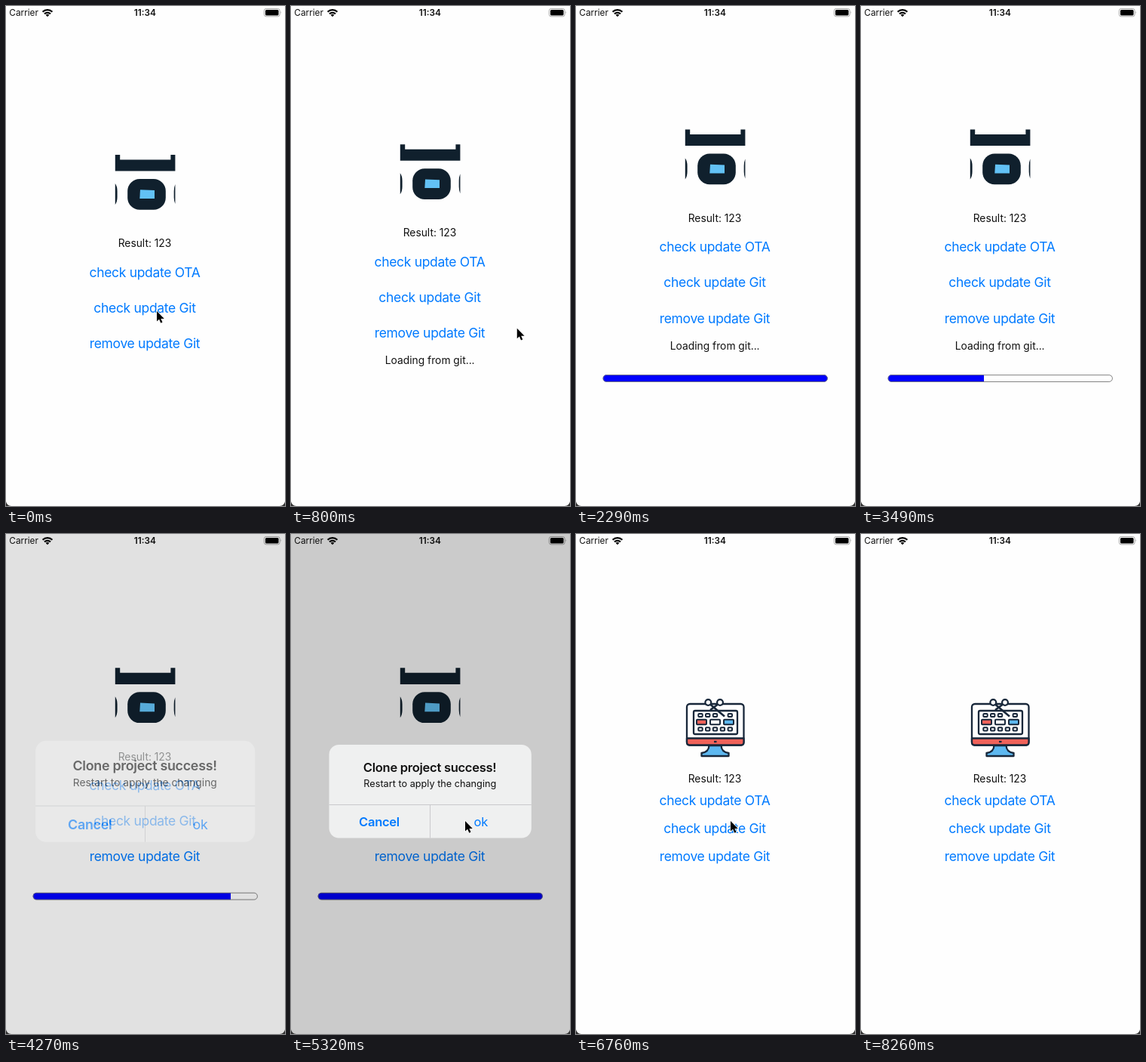
Recreate the animation shown at these times as an HTML page. Size 370 by 662 pixels, loop 8.31 s.

```html
<!DOCTYPE html>
<html lang="en">
<head>
<meta charset="utf-8">
<title>Update flow</title>
<style>
  html, body { margin: 0; width: 100%; height: 100%; overflow: hidden; background: #fefefe; }
  svg { display: block; width: 370px; height: 662px; }
  text { font-family: Inter, Roboto, sans-serif; font-size: 13.8px; fill: #111; }
  .mid text, text.mid { text-anchor: middle; }
  .link text { font-size: 17.5px; letter-spacing: -.018em; fill: #007aff; }
  .status text { font-size: 11.8px; }
  .alert text { font-size: 16.5px; letter-spacing: -.016em; }
  .alert .note { font-size: 12.7px; letter-spacing: 0; }
  .alert .action { fill: #007aff; }
  .strong { font-weight: 600; }
  .soft { filter: blur(.45px); }
</style>
</head>
<body>
<svg viewBox="0 0 370 662">
  <rect width="370" height="662" fill="#fefefe"/>

  <g class="status">
    <text x="4.3" y="13.4">Carrier</text>
    <g fill="none" stroke="#000" stroke-width="2.2">
      <path d="M48.6 7.7a9.2 9.2 0 0 1 12.8 0M51 10.4a5.8 5.8 0 0 1 8 0"/>
    </g>
    <path d="M52.8 11.9a3.2 3.2 0 0 1 4.4 0L55 14.2z"/>
    <text class="mid strong" x="184.3" y="13.4">11:34</text>
    <rect x="342.3" y="3.500" width="20.800" height="10.400" rx="2.800" fill="none" stroke="#aaa"/>
    <rect x="343.900" y="5" width="17.600" height="7.500" rx="1.600"/>
    <path d="M364.400 7.100q1.600 1.600 0 3.200z" fill="#aaa"/>
  </g>

  <g id="before" class="mid">
    <g id="stack">
      <g class="soft">
        <g fill="#10202d">
          <path d="M144.800 197h6.400v6.500h67.200V197h6v21.600h-79.600z"/>
          <rect x="161.200" y="229" width="50.600" height="40.800" rx="16"/>
          <path d="M144.800 235q2.800 4 2.800 10v8q0 6-2.800 10zM224.400 236q-1.700 4-1.700 9v8q0 5 1.700 9z"/>
        </g>
        <path d="M178 243.300l19 .8v10.800h-19.700z" fill="#62c1f5"/>
      </g>
      <text x="184" y="319.300">Result: 123</text>
      <g class="link">
        <text x="184" y="358.500">check update OTA</text>
        <text x="184" y="405.800" id="git">check update Git</text>
        <text x="184" y="453">remove update Git</text>
      </g>
      <text x="184.200" y="488" id="loading">Loading from git...</text>
    </g>
    <g id="bar">
      <clipPath id="pill"><rect x="35.700" y="488.300" width="298" height="9.400" rx="4.700"/></clipPath>
      <rect id="fill" x="35" y="488" height="10" fill="#00f" clip-path="url(#pill)"/>
      <rect x="36" y="488.600" width="297.400" height="8.900" rx="4.450" fill="none" stroke="#777" stroke-width=".9"/>
    </g>
  </g>

  <g id="after" class="mid">
    <g stroke="#18273a" stroke-width="2.300" fill="#fff" stroke-linejoin="round">
      <path d="M176.500 280h16q.5 9 10 10v4h-36v-4q9.500-1 10-10z" fill="#5db8f0"/>
      <rect x="147" y="225" width="75.500" height="54.500" rx="4"/>
      <path d="M147 270.500h75.500v5.500q0 3.500-3.500 3.500h-68.500q-3.500 0-3.500-3.500z" fill="#f0625a"/>
      <rect x="156" y="234" width="58" height="31" rx="2"/>
      <path d="M183 275h3.500"/>
      <g id="keys" stroke-width="2"></g>
      <path d="M178.500 226l18.500 15.500M187.500 226l-9.500 7" stroke-width="2.600"/>
      <circle cx="175.300" cy="223" r="3.900"/>
      <circle cx="191" cy="223" r="3.900"/>
    </g>
    <text x="184" y="329.300">Result: 123</text>
    <g class="link">
      <text x="184" y="358.500">check update OTA</text>
      <text x="184" y="395.800">check update Git</text>
      <text x="184" y="433.100">remove update Git</text>
    </g>
  </g>

  <rect id="dim" width="370" height="662"/>
  <g id="alert" class="alert mid">
    <rect x="50.500" y="279" width="268.300" height="123.600" rx="13" fill="#eff0f0"/>
    <path d="M50.500 358.500h268.300M184.500 358.500v44" stroke="#c6c6c9" stroke-width=".9"/>
    <text class="strong" x="184.100" y="315">Clone project success!</text>
    <text class="note" x="184.300" y="334.600">Restart to apply the changing</text>
    <text class="action strong" x="117" y="387.200">Cancel</text>
    <text class="action" x="251.800" y="387.200">ok</text>
  </g>

  <path d="M0 656q1 5.500 7 6H0zM370 656q-1 5.500-7 6h7z" fill="#333"/>
  <path id="cursor" d="M0 0V13.600L3.100 10.700 5.300 15.700 7.500 14.800 5.400 9.900H9.800z" stroke="#fff" stroke-width="1.300" paint-order="stroke"/>
</svg>

<script>
const LOOP = 8310, TICK = 60;
const el = id => document.getElementById(id);
const [before, stack, git, loading, bar, fill, after, dim, alertBox, cursor] =
  ["before", "stack", "git", "loading", "bar", "fill", "after", "dim", "alert", "cursor"].map(el);

// Small keys on the monitor's screen
const key = (x, y, w, h, color) =>
  `<rect x="${x - w / 2}" y="${y - h / 2}" width="${w}" height="${h}" rx="1" fill="${color}"/>`;
el("keys").innerHTML =
  [165, 174.7, 184.5, 204.3].map(x => key(x, 240, 5.4, 4.2, "#fff")).join("") +
  [165, 174.7, 184.5, 194.4, 204.3].map(x => key(x, 258.3, 5.4, 4.2, "#fff")).join("") +
  ["#f0625a", "#fff", "#5db8f0"].map((c, i) => key(166.5 + 18 * i, 249, 13, 6.6, c)).join("");

const ACTIVE = [[0, 0], [90, 860], [2050, 2290], [3490, 3490], [4090, 4570], [4720, 5560],
  [5620, 5800], [6100, 6100], [6520, 7300], [7480, 7960]];

const POINTER = [
  [0, 200, 404], [400, 200, 404], [800, 314, 430], [801, 400, 440],
  [4719, 400, 470], [4720, 358, 455], [5080, 245, 390], [5320, 231, 380],
  [5380, 228, 397], [5440, 221, 430], [5800, 225, 521], [6480, 225, 521],
  [6760, 205, 380], [6960, 150, 234], [7080, 111, 270], [7300, 158, 346],
  [7440, 158, 346], [7960, 346, 668], [LOOP, 346, 668]];

const ramp = (t, a, b) => Math.min(1, Math.max(0, (t - a) / (b - a)));
const easeOut = p => 1 - (1 - p) ** 2;
const easeBoth = p => p < .5 ? 2 * p * p : 1 - 2 * (1 - p) ** 2;

function refreshTime(t) {
  const [start, end] = ACTIVE.findLast(span => span[0] <= t);
  return Math.min(end, start + Math.floor((t - start) / TICK) * TICK);
}

function pointerAt(t) {
  const i = Math.max(1, POINTER.findIndex(p => p[0] >= t));
  const [a, ax, ay] = POINTER[i - 1], [b, bx, by] = POINTER[i];
  const p = ramp(t, a, b);
  return [ax + (bx - ax) * p, ay + (by - ay) * p];
}

function fillEnd(t) {
  if (t < 3490) return 35 + 299 * ramp(t, 2100, 2290);
  if (t < 4090) return 163;
  return t < 4270 ? 163 + 135 * ramp(t, 4040, 4270) : 298 + 36 * ramp(t, 4270, 4360);
}

function draw(now) {
  const t = refreshTime(now);
  const loadIn = easeBoth(ramp(t, 280, 580));
  const loadOut = easeOut(ramp(t, 4040, 4260));
  const barIn = easeBoth(ramp(t, 1985, 2275));
  const shift = -13.8 * (loadIn - loadOut) - 19.7 * barIn;
  const press = ramp(t, 60, 150) - ramp(t, 240, 420);

  before.style.display = t < 5680 ? "" : "none";
  after.style.display = t >= 6100 ? "" : "none";
  stack.setAttribute("transform", `translate(0 ${shift})`);
  git.setAttribute("opacity", 1 - .8 * press);
  loading.setAttribute("opacity", loadIn - loadOut);
  bar.setAttribute("opacity", barIn);
  bar.setAttribute("transform", `translate(0 ${-13.4 * loadOut})`);
  fill.setAttribute("width", fillEnd(t) - 35);

  const shown = easeOut(ramp(t, 4120, 4550));
  const visible = shown - easeOut(ramp(t, 5330, 5560));
  dim.setAttribute("opacity", .2 * visible);
  alertBox.setAttribute("opacity", visible);
  alertBox.setAttribute("transform",
    `translate(184.5 340.7) scale(${1.2 - .2 * shown}) translate(-184.5 -340.7)`);

  cursor.setAttribute("transform", `translate(${pointerAt(t)})`);
}

const origin = performance.now();
function loop() {
  draw((performance.now() - origin) % LOOP);
  requestAnimationFrame(loop);
}
loop();
</script>
</body>
</html>
```
